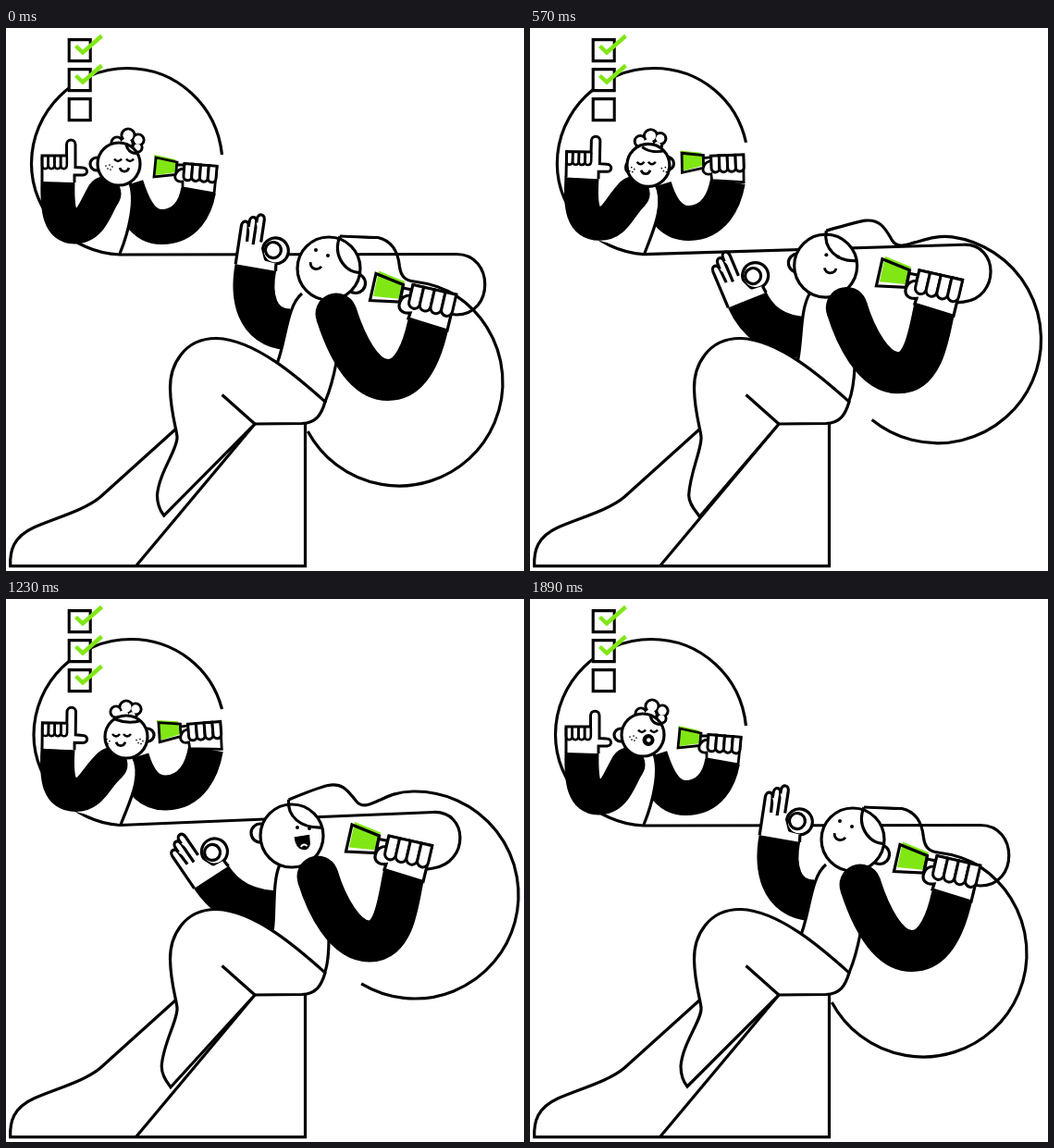
These frames come from a looping animation (560 px wide and 587 px high, 1920 ms). An HTML page with a canvas:

```html
<!DOCTYPE html>
<html lang="en">
<head>
<meta charset="utf-8">
<title>Checklist duo</title>
<style>
  html, body { margin: 0; width: 100%; height: 100%; overflow: hidden; background: #fff; }
  canvas { display: block; width: 560px; height: 587px; }
</style>
</head>
<body>
<canvas id="stage"></canvas>
<script>
const LOOP = 1920, GREEN = '#80e714', INK = '#000', PAPER = '#fff';
const canvas = document.getElementById('stage');
const dpr = window.devicePixelRatio || 1;
canvas.width = 560 * dpr;
canvas.height = 587 * dpr;
const g = canvas.getContext('2d');

const lerp = (a, b, k) => a + (b - a) * k;
const smooth = x => { x = Math.min(1, Math.max(0, x)); return x * x * (3 - 2 * x); };
const rad = deg => deg * Math.PI / 180;

// Blends two path strings of the same structure.
function mix(a, b, k) {
  const goal = b.match(/-?[\d.]+/g);
  let i = 0;
  return a.replace(/-?[\d.]+/g, n => lerp(+n, +goal[i++], k).toFixed(2));
}

function track(keys, t) {
  for (let i = 1; i < keys.length; i++) {
    const [t0, v0] = keys[i - 1], [t1, v1] = keys[i];
    if (t <= t1) return lerp(v0, v1, smooth((t - t0) / (t1 - t0)));
  }
  return keys[keys.length - 1][1];
}

function shape(d, fill, width = 3.2, color = INK) {
  const path = new Path2D(d);
  if (fill) { g.fillStyle = fill; g.fill(path); }
  if (width) { g.lineWidth = width; g.strokeStyle = color; g.stroke(path); }
}

function disc(x, y, r, fill, width = 3.2) {
  g.beginPath();
  g.arc(x, y, r, 0, 7);
  if (fill) { g.fillStyle = fill; g.fill(); }
  if (width) { g.lineWidth = width; g.strokeStyle = INK; g.stroke(); }
}

function at(x, y, deg, draw) {
  g.save();
  g.translate(x, y);
  g.rotate(rad(deg));
  draw();
  g.restore();
}

function fist(x, y, deg, w, h) {
  at(x, y, deg, () => {
    for (let i = 0; i < 4; i++) {
      g.beginPath();
      g.roundRect(i * w, 0, w, h, [0, 0, w / 2, w / 2]);
      g.fillStyle = PAPER;
      g.fill();
      g.lineWidth = 3;
      g.strokeStyle = INK;
      g.stroke();
    }
  });
}

const HAND_KEYS = [[0, 0], [330, 1], [400, 1], [630, .1], [780, .6], [960, 1.1], [1030, 1.1],
  [1290, .1], [1410, .28], [1600, .8], [1650, .75], [1880, 0], [1920, 0]];

function pose(t) {
  return {
    turn: smooth((t - 280) / 440) - smooth((t - 1260) / 420),
    lift: track(HAND_KEYS, t),
    foot: 6.9 * (1 - Math.cos(2 * Math.PI * (t - 357) / 384)),
    manMouth: talk(t, 720, 1350),
    girlMouth: talk(t, 1530, LOOP),
    ticks: 2 + (t >= 930 && t < 1560 ? smooth((t - 930) / 80) : 0)
  };
}

function talk(t, from, to) {
  if (t < from || t >= to) return 'smile';
  return Math.floor((t - from) / 90) % 2 ? 'open' : 'round';
}

function mouth(kind, size) {
  if (kind === 'smile') {
    shape(`M${-.75 * size} ${-.2 * size} C${-.5 * size} ${.6 * size} ${.5 * size} ${.6 * size} ${.75 * size} ${-.2 * size}`, null, 2.8);
  } else if (kind === 'round') {
    disc(0, 0, size, INK, 0);
    disc(size * .05, 0, size * .34, PAPER, 0);
  } else {
    const s = size;
    shape(`M${-s} ${-.7 * s} L${.85 * s} ${-.85 * s} L${.85 * s} ${.2 * s} C${.8 * s} ${1.25 * s} ${-.9 * s} ${1.3 * s} ${-s} ${-.7 * s}Z`, INK, 1);
    shape(`M${-.3 * s} ${.55 * s} Q${.1 * s} ${.1 * s} ${.5 * s} ${.5 * s}`, null, 2, PAPER);
  }
}

function ground() {
  shape('M183 434 L102 507 C84 522 52 530 30 540 C8 550 4 565 4.7 581.7 L323.5 581.7 L323.5 428');
  shape('M269 428 L141 581');
}

function thread(p) {
  shape(mix(
    'M233.5 137 C228 84 185 43.5 131 43.5 C74 43.5 27.5 90 27.5 146.5 C27.5 200 70 243 123 245 L487 244.5 C528 244.5 528 310 487 310 L478 309',
    'M233.5 119 C222 75 183 43.5 135 43.5 C77 43.5 30 90 30 147 C30 198 72 241 123 244.5 L462 230.5 C500 229 501 285 462 291 L450 293', p));
}

function girlBrushHand(p) {
  at(lerp(208, 216, p), lerp(176, 162, p), -9 * p, () => {
    g.translate(-208, -176);
    shape('M160.5 137 L183 142 L184 156 L162 159Z', GREEN, 0);
    shape('M162 140 L185 145 L184 158.5 L160 161Z', null, 2.8);
    shape('M184.5 148 L194 148 L193 157 L184 156Z', PAPER, 2.8);
    shape('M228 150 L225 179 L191 173 L191 166 C184 167 181 162 184 157 C186 153 189 152 193 152 L193 147Z', PAPER, 2.8);
    fist(193, 146.5, 4.5, 8.8, 18);
  });
}

function girlPointHand(p, lift) {
  at(56, 166 - 17 * lift, 10 * lift * (1 - .7 * p), () => {
    g.translate(-56, -166);
    shape('M39 166 L39 138 L65.5 138 L65.5 126 C65.5 119.5 75 119.5 75 126 L75 150.5 L83 151 C89 151 89 159 83 159 L74 159 L74 167', PAPER, 3);
    for (let i = 0; i < 4; i++) {
      const x = 39 + i * 6.7;
      shape(`M${x} 139 L${x} 148 C${x} 153.5 ${x + 6.7} 153.5 ${x + 6.7} 148 L${x + 6.7} 139`, null, 2.6);
    }
  });
}

function girlHead(p, kind) {
  at(lerp(122, 130, p), lerp(147, 149, p), 0, () => {
    disc(lerp(-24, -15, p), lerp(0, 3, p), 7, PAPER);
    disc(lerp(14, 23, p), -2, 7, PAPER);
    const lumps = [[-2, -23, 6, -11, -27], [10, -31, 7, 0, -32], [21, -26, 6, 10, -30], [20, -18, 5, 6, -23], [8, -22, 7, -3, -23]]
      .map(([x, y, r, bx, by]) => [lerp(x, bx, p), lerp(y, by, p), r]);
    lumps.forEach(([x, y, r]) => disc(x, y, r, PAPER));
    lumps.forEach(([x, y, r]) => disc(x, y, r - 1.5, PAPER, 0));
    disc(0, 0, 23, PAPER);
    g.save();
    g.beginPath();
    g.arc(0, 0, 23, 0, 7);
    g.clip();
    shape(mix('M8 -22 C9 -13 16 -10 24 -12', 'M-12 -19 C-2 -15 9 -15 17 -18', p), null, 3);
    for (const cx of [lerp(-11, -22, p), lerp(27, 14, p)])
      for (const [x, y] of [[-3, -1], [1, -2], [4, 0], [-1, 2], [2, 3]])
        disc(cx + x, lerp(3, 4.5, p) + y, .85, INK, 0);
    for (const x of [lerp(-1, -11, p), lerp(12, 1, p)]) {
      const y = lerp(-5.5, -3, p);
      shape(`M${x - 4} ${y} Q${x} ${y + 5} ${x + 4} ${y}`, null, 2.5);
    }
    g.restore();
    at(lerp(6, -6, p), lerp(5.5, 7, p), 0, () => mouth(kind, 6.5));
  });
}

function girl({ turn: p, lift, girlMouth }) {
  shape(mix('M130 170 C138 195 148 215 168 215 C195 215 205 193 208 176',
    'M136 172 C142 192 152 210 173 209.5 C200 209 212 185 216 162', p), null, 38);
  girlBrushHand(p);
  shape(mix('M133 165 C142 185 132 222 123 243 L72 229 L84 207 L105 165Z',
    'M137 170 C149 192 132 222 124 243 L72 229 L84 207 L105 165Z', p), PAPER, 0);
  shape(mix('M133 165 C142 185 132 222 123 244', 'M137 170 C149 192 132 222 124 244', p));
  shape('M71 228 Q76 217 86 207');
  const ex = 74 + 5 * p * lift, ey = 215 - 15 * lift, sx = 106 + 7 * p;
  shape(`M56 ${166 - 17 * lift} C${55 - 5 * lift} ${199 - 14 * lift} ${59 - 5 * lift} ${ey} ${ex} ${ey} C${ex + 18} ${ey} 96 ${195 - 5 * lift} ${sx} 179`, null, 37);
  disc(sx, 179, 18.5, INK, 0);
  girlPointHand(p, lift);
  girlHead(p, girlMouth);
}

function okHand(x, y, deg) {
  at(x, y, deg, () => {
    shape('M-22 0 L-23 -38 L0 -38 L2 -18 L20 -9 L22 0Z', PAPER, 0);
    disc(18, -20.5, 14, PAPER);
    shape('M-22 1 L-23 -40 L0 -40 L0 -26 L8 -8 L21 -7 L22 1Z', PAPER, 0);
    shape('M-22 1 L-23 -41 C-23 -48 -15.2 -48 -15.2 -41 L-14 -25', PAPER);
    shape('M-15.2 -41 L-15.2 -47 C-15.2 -54 -7.6 -54 -7.6 -47 L-7 -23', PAPER);
    shape('M-7.6 -47 L-7.6 -51 C-7.6 -58 .4 -58 .4 -51 L1 -27', PAPER);
    disc(15.5, -21, 8.5, PAPER);
    shape('M21 -7 L22 1');
  });
}

function manBrushHand(p) {
  at(-26 * p, -21.5 * p, 0, () => {
    shape('M403 262.5 L431 274 L427 293 L397 290Z', GREEN, 0);
    shape('M400 265.5 L429.5 277.5 L425.5 296 L393.5 294.5Z');
    shape('M429 281 L439 283 L436 293 L427 291Z', PAPER, 3);
    shape('M486.5 288 L477 327 L435 314 L437 308 C427 309 423 303 426 296 C428 291 432 289 437 289 L440 278Z', PAPER);
    fist(440, 277.5, 13, 12, 25);
  });
}

function manHead(p, kind) {
  at(lerp(349, 309, p), lerp(260, 256, p), 0, () => {
    disc(lerp(29, 14, p), lerp(16, 14, p), 10.5, PAPER);
    disc(lerp(-20, -34, p), -3, 10, PAPER);
    disc(0, 0, 34, PAPER);
    disc(lerp(-14, 6, p), lerp(-20, -9, p), 2, INK, 0);
    disc(lerp(-1, 19, p), lerp(-14, -8, p), 2, INK, 0);
    at(lerp(-14.5, 12, p), lerp(-3, 7, p), lerp(22, -4, p), () => mouth(kind, 8.5));
  });
}

function manHair(p) {
  const cx = 425 + 17 * Math.sin(p * Math.PI / 2), cy = lerp(383, 320, p), r = 112;
  const from = rad(lerp(-56.7, -91, p)), to = rad(lerp(151.8, 121.1, p));
  const sx = cx + r * Math.cos(from), sy = cy + r * Math.sin(from);
  const tx = sx + 17 * Math.sin(from), ty = sy - 17 * Math.cos(from);
  const ex = cx + r * Math.cos(to), ey = cy + r * Math.sin(to);
  const lock = mix(
    'M361 225 C375 226 395 226 402 226.5 C418 230 424 243 425.5 258 C427 270 433 273 441 274',
    'M305.5 217 C320 211 337 204 348 201.5 C366 198 371 210 379 219 C386 227 395 221 405 217', p);
  const lead = mix('457 276', '413 213', p);
  shape(`${lock} C${lead} ${tx} ${ty} ${sx} ${sy} A${r} ${r} 0 1 1 ${ex} ${ey}`);
  shape(mix('M361 225 C352 248 370 267 384 264', 'M305.5 217 C304 235 318 248 342 247', p));
}

function man({ turn: p, foot: d, manMouth }) {
  const hx = lerp(270, 221.5, p), hy = lerp(258, 300, p) + 6 * Math.sin(Math.PI * p);
  const bend = mix('C264 290 270 324 306 326', 'C237 324 260 338 300 338', p);
  shape(`M${hx} ${hy} ${bend}`, null, 45);
  okHand(hx, hy, lerp(10, -33, p));
  shape(mix('M352 300 L357 362 C354 378 350 392 345 404 L320 412 L290 374 L294 360 C303 335 304 300 320 287',
    'M334 300 L349 366 C349 385 348 395 344.5 404 L320 412 L286 374 L288.5 356 C291 335 288 305 296 287', p), PAPER);
  shape(`M345 404 C318 380 270 337 228 335.5 C192 335 177 365 177.5 390 C178 415 184 432 185 442
    C186 455 ${165 + .6 * d} 480 ${163 + .65 * d} 505 C${163 + .65 * d} 515 ${166 + d} 522 ${170 + d} ${527 + .1 * d}
    L269 428 L320 427.5 C335 427 341 418 345 404Z`, PAPER);
  shape('M233.5 396.5 L269 428');
  manHead(p, manMouth);
  manHair(p);
  shape(mix('M357 309 C367 340 385 380.5 413 380.5 C440 380.5 451 345 456.5 320',
    'M337 300 C346 330 366 370 393 370 C421 370 424 325 430 298', p), null, 45);
  disc(lerp(357, 337, p), lerp(309, 300, p), 22.5, INK, 0);
  manBrushHand(p);
}

function checklist(count) {
  for (let i = 0; i < 3; i++) {
    const y = 32 * i, part = Math.min(1, count - i);
    shape(`M68.2 ${12.6 + y} h23 v23 h-23Z`, PAPER, 3.1);
    if (part <= 0) continue;
    g.setLineDash([40 * part, 60]);
    shape(`M75.5 ${19.5 + y} L83 ${26.5 + y} L103.5 ${8.5 + y}`, null, 4.4, GREEN);
    g.setLineDash([]);
  }
}

function render(t) {
  const now = pose(t);
  g.setTransform(dpr, 0, 0, dpr, 0, 0);
  g.fillStyle = PAPER;
  g.fillRect(0, 0, 560, 587);
  ground();
  thread(now.turn);
  checklist(now.ticks);
  girl(now);
  man(now);
}

const start = performance.now();
function tick() {
  render((performance.now() - start) % LOOP);
  requestAnimationFrame(tick);
}
tick();
</script>
</body>
</html>
```
